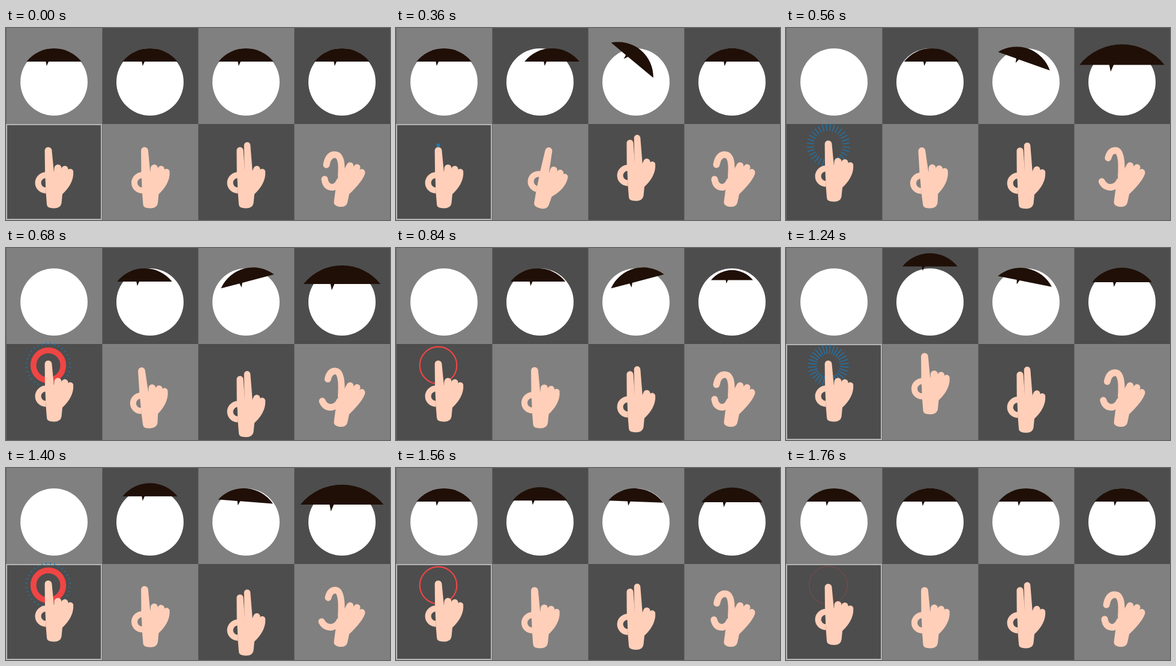
Recreate the animation shown at these times as an HTML page with a canvas. Size 640 by 320 pixels, loop 1.8 s.

```html
<!DOCTYPE html>
<html>
<head>
<meta charset="utf-8">
<style>
  html, body { margin: 0; height: 100%; overflow: hidden; background: #4d4d4d; }
  canvas { display: block; }
</style>
</head>
<body>
<canvas id="stage" width="640" height="320"></canvas>
<script>
const ctx = document.getElementById('stage').getContext('2d');
const LOOP = 1800, STEP = 40, TILE = 160;
const TAP_START = 360, TAP_LENGTH = 720;
const DARK = '#4d4d4d', LIGHT = '#808080', SKIN = '#ffcfb9', HAIR = '#1f0f07';
const BLUE = '#1c78b5', RED = '#f04545';

const hairShape = new Path2D('M34.2 56 A58.5 58.5 0 0 1 125.8 56 L71 56 L67.8 63.3 L66.3 56 Z');
const pointPalm = new Path2D('M65 78 L112.3 82 Q112 100 94 117 L92.5 132 Q91 140.5 80 140.5 Q68 140.5 68 134 L66.5 115 Z');
const pinchPalm = new Path2D('M74 75 L118.5 82 Q115 95 92 117 L89 131 Q87 139 76 138 Q66 136.5 66.5 130 L69 111 Q75 100 73 85 Z');

const mix = (a, b, p) => a + (b - a) * p;
const ease = p => (1 - Math.cos(Math.PI * Math.min(1, Math.max(0, p)))) / 2;

// Eases through poses that lie one beat apart.
function glide(t, start, beat, ...poses) {
  const at = Math.min(poses.length - 1, Math.max(0, (t - start) / beat));
  const i = Math.min(poses.length - 2, Math.floor(at));
  return mix(poses[i], poses[i + 1], ease(at - i));
}

// Draws in the coordinates of one tile, posed around (80, pivot).
function inTile(col, row, pivot, { x = 0, y = 0, angle = 0, scale = 1 }, paint) {
  ctx.save();
  ctx.translate(col * TILE + 80 + x, row * TILE + pivot + y);
  ctx.rotate(angle * Math.PI / 180);
  ctx.scale(scale, scale);
  ctx.translate(-80, -pivot);
  paint();
  ctx.restore();
}

function hair(col, pose = {}) {
  inTile(col, 0, 46, pose, () => {
    ctx.fillStyle = HAIR;
    ctx.fill(hairShape);
  });
}

// Tapered finger from a tip to a root.
function finger(x0, y0, r0, x1, y1, r1) {
  const a = Math.atan2(y1 - y0, x1 - x0), q = Math.PI / 2;
  ctx.beginPath();
  ctx.arc(x0, y0, r0, a + q, a + 3 * q);
  ctx.arc(x1, y1, r1, a - q, a + q);
  ctx.fill();
}

function hand(col, pose, paint) {
  inTile(col, 1, 140, pose, () => {
    ctx.fillStyle = ctx.strokeStyle = SKIN;
    paint();
  });
}

function pointingHand(col, pose, two = false) {
  hand(col, pose, () => {
    ctx.fill(pointPalm);
    ctx.lineWidth = 10;
    ctx.beginPath();
    ctx.ellipse(66.5, 98, 13, 12.7, 0, Math.PI / 2, Math.PI * 1.5);
    ctx.stroke();
    if (two) {
      finger(70, 44, 5.6, 71.5, 82, 6.8);
      finger(82, 35.5, 5.3, 84.5, 85, 6.8);
    } else {
      finger(70.5, 44.3, 5.9, 72.5, 82, 7.5);
      finger(86.5, 73.5, 6, 86, 95, 7);
    }
    finger(98, 75.5, 5.7, 90, 100, 8);
    finger(107, 80, 5.3, 90, 102, 8);
  });
}

function pinchingHand(col, spread) {
  const m = (a, b) => mix(a, b, spread);
  hand(col, {}, () => {
    ctx.fill(pinchPalm);
    finger(93.5, 69.5, 5.8, 85, 90, 8);
    finger(105, 72.5, 5.5, 88, 95, 9);
    finger(113, 80.5, 5.5, 90, 98, 9);
    ctx.lineWidth = 11;
    ctx.lineCap = 'round';
    ctx.stroke(new Path2D(`M${m(54, 57)} ${m(68, 56)}
      Q${m(57, 60)} ${m(51, 43)} ${m(68, 70)} ${m(51, 43.5)} Q80 ${m(51, 45)} 79 78
      M${m(51, 46)} ${m(92, 96)} Q${m(53, 51)} 106 ${m(65, 62)} 105.5 Q72 104 76 95`));
  });
}

function burst(p) {
  const x = 70.5, y = 195.5, rays = 32;
  const outer = 38.5 - 35.5 * Math.exp(-p / 75);
  const inner = outer * (1 - Math.max(0, 1 - p / 420) ** 1.7);
  ctx.strokeStyle = BLUE;
  ctx.lineWidth = 1.3;
  ctx.beginPath();
  for (let i = 0; i < rays; i++) {
    const a = (i + 0.5) * 2 * Math.PI / rays, c = Math.cos(a), s = Math.sin(a);
    ctx.moveTo(x + c * inner, y + s * inner);
    ctx.lineTo(x + c * outer, y + s * outer);
  }
  if (p < 420) ctx.stroke();

  if (p <= 220) return;
  const edge = 32 * (1 - Math.exp((220 - p) / 38));
  const width = Math.min(edge, 9.7 * Math.exp((320 - p) / 108));
  ctx.strokeStyle = RED;
  ctx.lineWidth = width;
  ctx.beginPath();
  ctx.arc(x, y, edge - width / 2, 0, 7);
  ctx.stroke();
}

function tap(t) {
  const p = t < TAP_START ? -1 : (t - TAP_START) % TAP_LENGTH;
  if (t < 520 || t >= 1480) hair(0);
  if (t < 520 || t >= 1240) {
    ctx.strokeStyle = '#b4b4b4';
    ctx.lineWidth = 2;
    ctx.strokeRect(1, TILE + 1, TILE - 2, TILE - 2);
  }
  if (p >= 0) burst(p);
  pointingHand(0, { y: -11 * ease(p / 160) * ease((TAP_LENGTH - p) / 80) });
}

function pan(t) {
  hair(1, {
    x: glide(t, 120, 280, 0, 21, -9, 0),
    y: glide(t, 940, 280, 0, -25.5, -2, 0)
  });
  pointingHand(1, {
    x: 0.5,
    y: glide(t, 960, 240, 0, -25, 0),
    angle: glide(t, 120, 240, 0, 14, -4, 0)
  });
}

function rotate(t) {
  hair(2, { angle: glide(t, 100, 325, 0, 44, -22, 18.6, 4.4, 0) });
  pointingHand(2, { y: glide(t, 100, 310, 0, -13, 16, -12, 13.5, 0) }, true);
}

function pinch(t) {
  hair(3, { scale: glide(t, 340, 260, 1, 1.58, 0.75, 0.75, 1.52, 1) });
  pinchingHand(3, glide(t, 340, 260, 0, 1, 0, 0, 1, 0));
}

function tiles() {
  for (let i = 0; i < 8; i++) {
    const col = i % 4, row = i >> 2;
    ctx.fillStyle = (col + row) % 2 ? DARK : LIGHT;
    ctx.fillRect(col * TILE, row * TILE, TILE, TILE);
    ctx.fillStyle = '#666';
    ctx.fillRect(col * TILE, row * TILE, 1, TILE);
    if (row) continue;
    ctx.fillStyle = '#fff';
    ctx.beginPath();
    ctx.arc(col * TILE + 80, 90, 56, 0, 7);
    ctx.fill();
  }
}

const begin = performance.now();
(function tick() {
  const t = Math.floor((performance.now() - begin) % LOOP / STEP) * STEP;
  tiles();
  for (const scene of [tap, pan, rotate, pinch]) scene(t);
  requestAnimationFrame(tick);
})();
</script>
</body>
</html>
```
